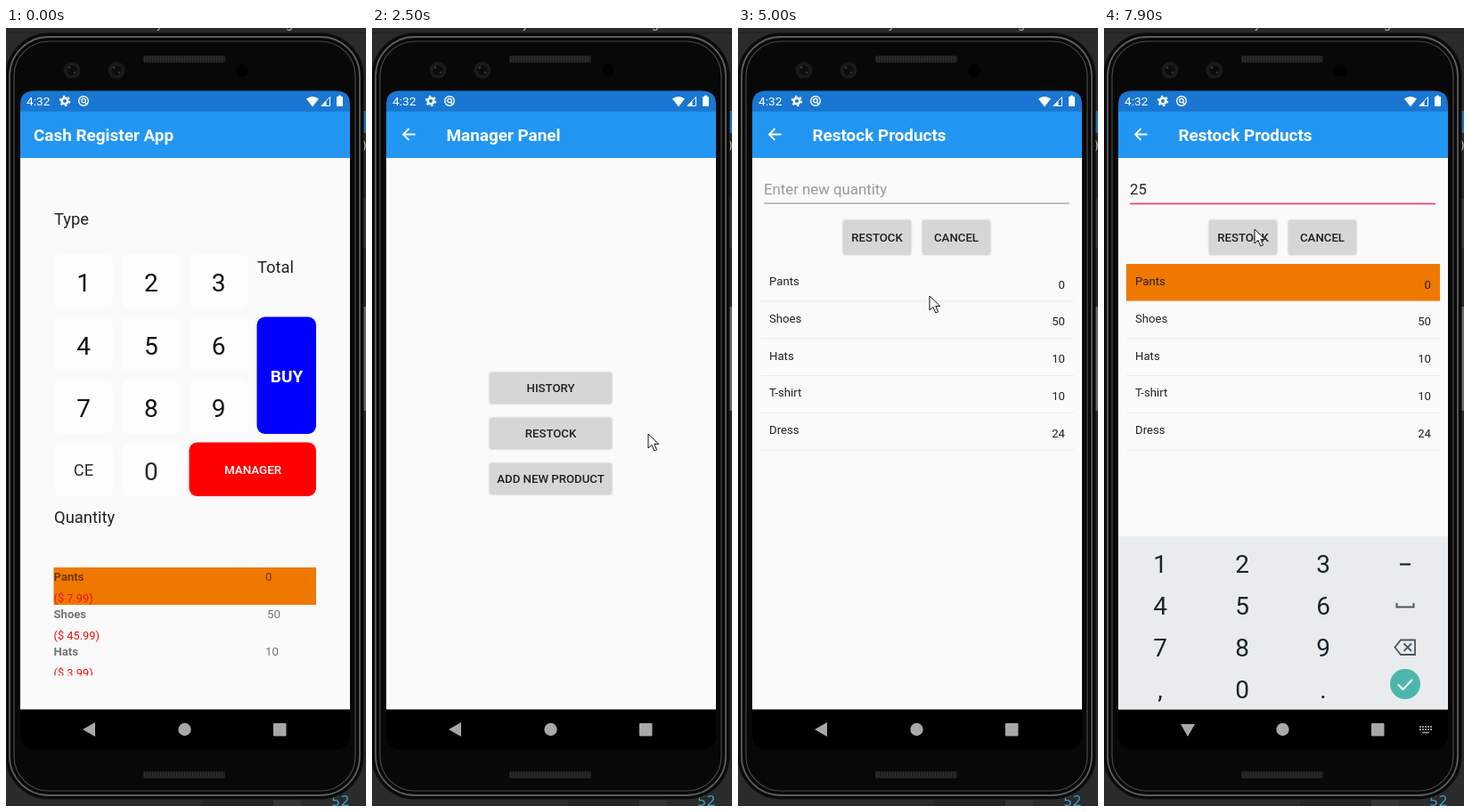
Write an HTML page that moves like this. It is 404x874 px and loops after 8 s.

```html
<!DOCTYPE html>
<html lang="en">
<head>
<meta charset="utf-8">
<title>Cash register</title>
<style>
html, body { margin: 0; height: 100%; overflow: hidden; background: #2b2b2b; }
svg { display: block; width: 100vw; height: 100vh; }
text { font-family: Roboto, sans-serif; white-space: pre; }
.key { filter: drop-shadow(0 .6px .8px #0004); }
</style>
</head>
<body>
<script>
const rect = (x, y, w, h, fill, r = 0, more = '') =>
  `<rect x="${x}" y="${y}" width="${w}" height="${h}" rx="${r}" fill="${fill}" ${more}/>`;
const dot = (x, y, r, fill, more = '') => `<circle cx="${x}" cy="${y}" r="${r}" fill="${fill}" ${more}/>`;
const path = (d, fill, more = '') => `<path d="${d}" fill="${fill}" ${more}/>`;
const line = (d, color, w) => path(d, 'none', `stroke="${color}" stroke-width="${w}"`);
const text = (x, y, s, size, fill, more = '') =>
  `<text x="${x}" y="${y}" font-size="${size}" fill="${fill}" ${more}>${s}</text>`;
const mid = 'text-anchor="middle"', bold = 'font-weight="700"', medium = 'font-weight="500"';
const group = (id, body, more = '') => `<g id="${id}" ${more}>${body}</g>`;
const button = (x, y, w, h, s) =>
  rect(x, y, w, h, '#d6d6d6', 2, 'class="key"') + text(x + w / 2, y + h / 2 + 4.7, s, 13.2, '#212121', `${mid} ${medium}`);
const ORANGE = '#f07800', PINK = '#e5487d', PAPER = '#fafafa', NAV = 765.4;

function phone() {
  const speaker = y => rect(154, y, 92, 8, '#202020', 2) +
    line(`M155 ${y + 4}H245`, '#2d2d2d', '6" stroke-dasharray="1 2');
  const lens = x => dot(x, 47.5, 9.5, '#1a1a1a') + dot(x, 47.5, 5.5, '#0c0c0c') +
    dot(x - 3, 44.5, 1.3, '#3c3c3c') + dot(x + 3, 50, 1.3, '#333');
  const rim = (inset, color, w) =>
    rect(inset, 6 + inset, 401 - 2 * inset, 860 - 2 * inset, '#080808', 48 - inset, `stroke="${color}" stroke-width="${w}"`);
  return rect(0, 0, 404, 874, '#2b2b2b') +
    text(169, 0, 'y', 14, '#bbb') + text(314, 0, 'g', 14, '#bbb') +
    rect(0, 5, 404, 1, '#202020') + rect(220, 867, 80, 7, '#242424') + rect(300, 867, 31, 7, '#333') +
    text(365, 874, '52', 17, '#3a9cc8', 'style="font-family:Noto Sans Mono,monospace"') +
    rect(401, 93, 3, 25, '#1f6fb5') + text(400, 136, ')', 13, '#ccc') +
    rect(400, 313, 4, 117, '#6a6a6a', 1) + rect(400, 192, 4, 55, '#3c3c3c', 1) +
    rim(.5, '#0c0c0c', 2) + rim(4, '#5c5c5c', 1.8) + rim(9, '#484848', 1.2) +
    speaker(31) + speaker(835) + lens(74) + lens(124) + dot(265, 47.5, 7, '#010101') +
    rect(16, 71, 370, 739.5, '#000', 15);
}

function bars() {
  return path('M16 93.2V86Q16 70.6 32 70.6H370Q386 70.6 386 86V93.2Z', '#1976d2') +
    rect(16, 93.2, 370, 52.8, '#2196f3') +
    text(23, 87.2, '4:32', 13.7, '#fff') +
    dot(66, 82, 3.3, 'none', 'stroke="#fff" stroke-width="2.6"') +
    dot(66, 82, 5.3, 'none', 'stroke="#fff" stroke-width="1.8" stroke-dasharray="2.4 3.15"') +
    dot(87, 82, 5.3, 'none', 'stroke="#fff" stroke-width="1.4"') +
    dot(87, 81.6, 2.2, 'none', 'stroke="#fff" stroke-width="1.3"') + line('M88 83L91 86', '#fff', 1.4) +
    path('M337 79.5Q344 74.5 351 79.5L344 88.5Z', '#fff') +
    path('M354 87.5L363.5 77.5V87.5Z', 'none', 'stroke="#fff"') + path('M354 87.5L359.5 82V87.5Z', '#fff') +
    rect(371, 77, 7, 11, '#fff', 1) + rect(373, 75.7, 3, 2, '#fff') +
    group('back', line('M48.5 119.5H35.5M41.5 113L35 119.5L41.5 126', '#fff', 1.8)) +
    text(31, 127, '', 18.9, '#fff', `${bold} id="title"`);
}

function register() {
  let s = '';
  const rows = [254, 324.5, 395, 465.5];
  for (let i = 0; i < 11; i++) {
    const x = 54 + i % 3 * 75.8, y = rows[i / 3 | 0], small = i == 9;
    s += rect(x, y, 66, 61, '#fdfdfd', 9) +
      text(x + 33, y + (small ? 37.5 : 42), small ? 'CE' : i == 10 ? 0 : i + 1,
        small ? 18.4 : 28, i < 9 ? '#111' : '#2b2b2b', mid);
  }
  s += text(54, 221, 'Type', 18.4, '#222') + text(282, 274.5, 'Total', 18.4, '#222') +
    text(54, 556, 'Quantity', 18.4, '#222') +
    rect(281.5, 324.5, 66.5, 131.5, '#00f', 9) + text(315, 398, 'BUY', 19, '#fff', `${mid} ${bold}`) +
    rect(205.5, 465.5, 142.5, 60.5, '#f00', 9) + text(277, 501, 'MANAGER', 13.4, '#fff', `${mid} ${medium}`) +
    rect(53.5, 606, 294.5, 42, ORANGE);
  let list = '';
  [['Pants', 0, '7.99', 291], ['Shoes', 50, '45.99', 293], ['Hats', 10, '3.99', 291]].forEach(([name, n, price, x], i) => {
    const y = 620.5 + 42 * i;
    list += text(53.5, y, name, 13.1, '#0000008a', bold) + text(x, y, n, 13.3, '#0000008a') +
      text(53.5, y + 24, `($ ${price})`, 12.8, '#f01010');
  });
  return s + `<g clip-path="url(#listBox)">${list}</g>`;
}

const manager = () =>
  ['HISTORY', 'RESTOCK', 'ADD NEW PRODUCT'].map((s, i) => button(132, 387 + 51 * i, 137, 35, s)).join('');

function restock() {
  let s = text(29, 187, '', 16.8, '#999', 'id="entry"') + rect(29, 196.5, 343, 1, '#8a8a8a', 0, 'id="rule"') +
    rect(29, 168, 1.8, 24, PINK, 0, 'id="caret"') +
    button(118, 216, 76, 38.5, 'RESTOCK') + button(207, 216, 76, 38.5, 'CANCEL') +
    rect(25, 265, 352, 42, ORANGE, 0, 'id="pick"');
  [['Pants', 0], ['Shoes', 50], ['Hats', 10], ['T-shirt', 10], ['Dress', 24]].forEach(([name, n], i) => {
    const y = 289 + 41.8 * i;
    s += text(35, y, name, 13.2, '#222') + text(367, y + 3.5, n, 13.2, '#222', 'text-anchor="end"') +
      rect(25, y + 17.5, 352, 1, '#ebebeb');
  });
  return s;
}

function keyboard() {
  const ink = '#16242c', soft = '#4a5860';
  let s = rect(16, 571, 370, NAV - 571, '#e9ecef');
  [...'123456789,0.'].forEach((c, i) => {
    s += text([63, 155, 246][i % 3], 612 + 47 * (i / 3 | 0), c, 28, ink, mid);
  });
  return s + line('M332 602.5H344', ink, 2.2) + line('M328.5 646V650.5H347.5V646', soft, 2) +
    line('M333 687.5H349V704H333L326.5 695.7ZM336.5 691.5L345 700M345 691.5L336.5 700', soft, 1.8) +
    dot(338, 737, 17, '#4db6ac') + line('M330 737.5L335.5 743L346 732', '#fff', 2);
}

const navIcons = () => path('M86 788L100 780V796Z', '#a8a8a8', 'id="navBack"') +
  dot(200.5, 788, 7.2, '#a8a8a8') + rect(300, 781, 14.5, 14.5, '#a8a8a8', 1) +
  group('switcher', line('M354 785H368M354 788H368', '#999', '2" stroke-dasharray="2 1') + line('M357 791.5H365', '#999', 1.6));

document.body.innerHTML = `<svg viewBox="0 0 404 874" preserveAspectRatio="none">
<clipPath id="content">${rect(16, 146, 370, NAV - 146)}</clipPath>
<clipPath id="listBox">${rect(53, 606, 296, 121.5)}</clipPath>
${phone()}
<g clip-path="url(#content)">${rect(16, 146, 370, 620, PAPER)}
${group('p0', register())}${group('p1', manager())}${group('p2', restock())}</g>
${bars()}${group('keys', keyboard())}${navIcons()}
${group('mouse', path('M0 0V16L4 12.4L6.8 19L9.6 17.8L6.8 11.4H11.8Z', '#fff', 'stroke="#111"'))}
</svg>`;

const $ = id => document.getElementById(id);
const set = (id, attrs) => { for (const k in attrs) $(id).setAttribute(k, attrs[k]); };
const show = (id, on) => { $(id).style.display = on ? '' : 'none'; };
const clamp = v => Math.max(0, Math.min(1, v));

// Piecewise linear track of [time, a, b] stops.
function track(stops, t) {
  const i = stops.findIndex(s => s[0] > t);
  if (i == 0) return stops[0].slice(1);
  if (i < 0) return stops.at(-1).slice(1);
  const a = stops[i - 1], b = stops[i], k = (t - a[0]) / (b[0] - a[0]);
  return [1, 2].map(j => a[j] + (b[j] - a[j]) * k);
}

const mousePath = [[100, 372, 840], [300, 330, 560], [600, 330, 560], [1000, 300, 495], [1200, 296, 483],
  [2000, 296, 483], [2500, 310, 456], [2700, 222, 456], [2900, 215, 452], [3200, 145, 279], [3600, 150, 230],
  [4200, 150, 230], [4500, 183, 173], [5000, 215, 301], [5500, 215, 301], [5600, 222, 200], [5700, 222, 200],
  [5800, 226, 186], [6900, 226, 186], [7600, 169, 226]];
const keysPath = [[5800, 30, .3], [5900, 27, .68], [6000, 8, .95], [6100, 0, 1]];
const turnPath = [[5800, 0, 0], [5900, 180, 0], [6000, 270, 0]];
const opens = [-1e4, 1475, 2775];
const titles = ['Cash Register App', 'Manager Panel', 'Restock Products'];

function draw(t) {
  // Each page grows and fades in while the one below grows and fades out.
  const grown = start => 1 - (1 - clamp((t - start) / 300)) ** 3;
  const faded = start => clamp((t - start - 45) / 94);
  opens.forEach((start, i) => {
    const leave = opens[i + 1] ?? 1e9;
    const scale = .85 + .15 * grown(start) + .15 * grown(leave);
    show('p' + i, t >= start && t < leave + 300);
    set('p' + i, {
      opacity: faded(start) * (1 - faded(leave)),
      transform: `translate(201 456) scale(${scale}) translate(-201 -456)`
    });
  });
  const page = opens.findLastIndex(start => t >= start);
  $('title').textContent = titles[page];
  set('title', { x: page ? 83.5 : 31 });
  show('back', page);

  const focus = t >= 5800;
  const typed = t < 6500 ? '' : t < 7400 ? '2' : '25';
  const since = t - (t < 6500 ? 5800 : t < 7400 ? 6500 : 7400);
  $('entry').textContent = typed || 'Enter new quantity';
  set('entry', { fill: typed ? '#222' : '#999' });
  set('rule', { fill: focus ? PINK : '#8a8a8a', height: focus ? 1.8 : 1 });
  set('caret', { x: 29 + 9.5 * typed.length });
  show('caret', focus && since % 1000 < 500);
  show('pick', t >= 5600);

  const [drop, alpha] = track(keysPath, t);
  show('keys', focus);
  show('switcher', focus);
  set('keys', { transform: `translate(0 ${drop})`, opacity: alpha });
  set('navBack', { transform: `rotate(${track(turnPath, t)[0]} 94 788)` });

  show('mouse', t >= 100);
  set('mouse', { transform: `translate(${track(mousePath, t)})` });
}

const begin = performance.now();
function tick() {
  draw(Math.floor((performance.now() - begin) % 8000 / 100) * 100);
  requestAnimationFrame(tick);
}
tick();
</script>
</body>
</html>
```
